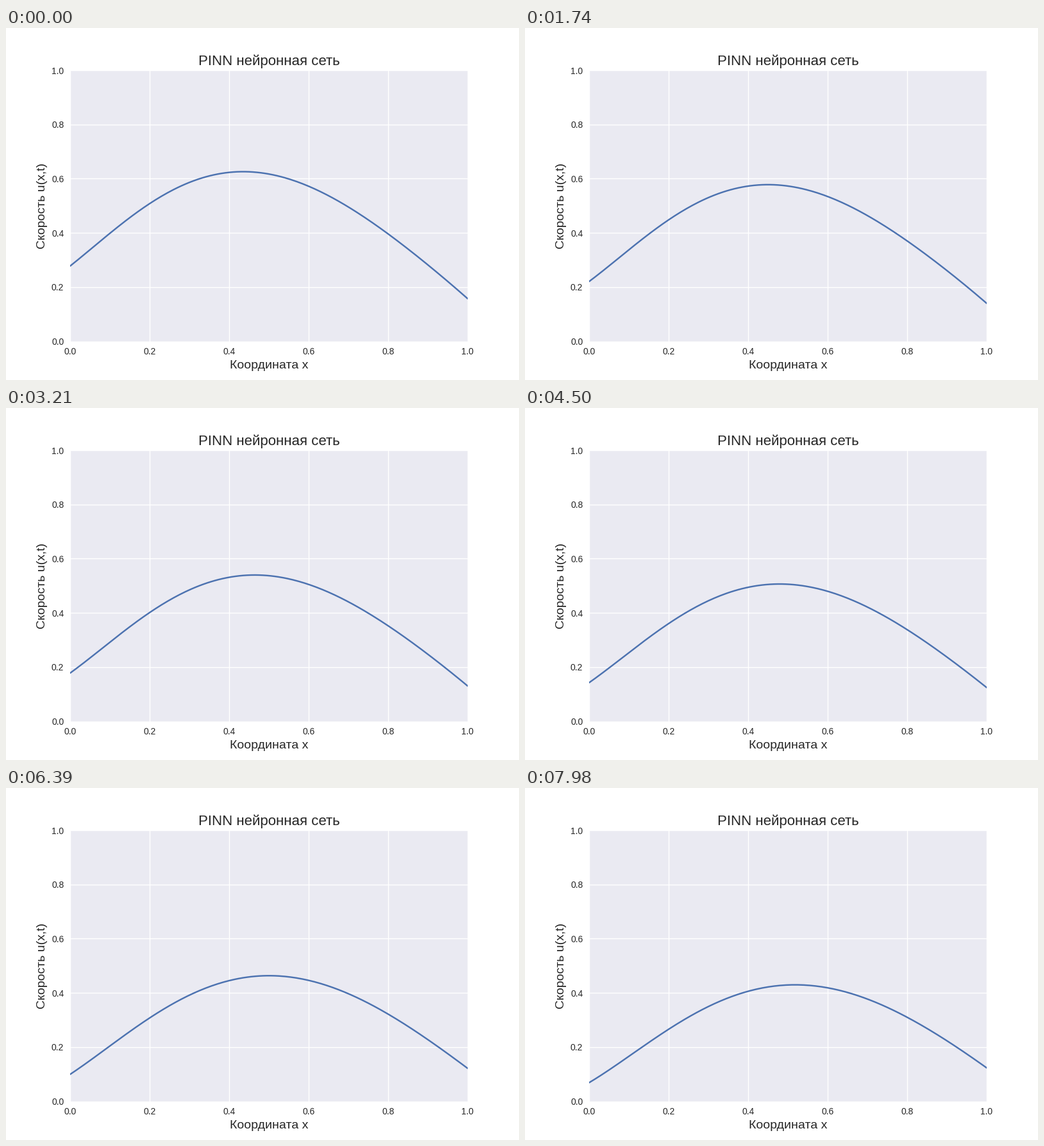
Animation, 800 px wide and 550 px high, one loop 8000 ms. Source, as a matplotlib script:

```python
import numpy as np
import matplotlib.pyplot as plt
from matplotlib.animation import FuncAnimation

LOOP, TICK, STEP = 8000, 20, 30  # ms
INK = "0.15"

plt.rcParams.update({
    "font.family": "Liberation Sans",
    "text.color": INK,
    "axes.labelcolor": INK,
    "axes.facecolor": "#EAEAF2",
    "axes.linewidth": 0,
    "axes.axisbelow": True,
    "axes.grid": True,
    "grid.color": "white",
    "grid.linewidth": 1,
    "lines.solid_capstyle": "round",
})
for axis in ("xtick", "ytick"):
    plt.rcParams.update({
        f"{axis}.color": INK,
        f"{axis}.labelsize": 10,
        f"{axis}.major.size": 0,
        f"{axis}.major.pad": 7,
    })

# Velocity at six positions (columns) for a few times (rows, seconds).
TIMES = [0, 1.74, 3.21, 4.5, 5.58, 7.2, 7.98]
NODES = np.linspace(0, 1, 6)
SPEED = np.array([
    [0.2775, 0.508, 0.623, 0.572, 0.396, 0.157],
    [0.2210, 0.448, 0.573, 0.534, 0.370, 0.140],
    [0.1770, 0.400, 0.530, 0.504, 0.352, 0.130],
    [0.1417, 0.361, 0.494, 0.480, 0.338, 0.124],
    [0.1170, 0.329, 0.466, 0.460, 0.328, 0.122],
    [0.0830, 0.285, 0.424, 0.431, 0.315, 0.122],
    [0.0685, 0.266, 0.406, 0.419, 0.310, 0.123],
])
DECAY = np.polyfit(TIMES, SPEED, 3)
x = np.linspace(0, 1, 201)


def profile(t):
    """Smooth velocity profile at t seconds."""
    values = t ** np.arange(3, -1, -1) @ DECAY
    return np.polyval(np.polyfit(NODES, values, 5), x)


fig, ax = plt.subplots(figsize=(8, 5.5), dpi=100)
ax.set(xlim=(0, 1), ylim=(0, 1))
ax.set_title("PINN нейронная сеть", fontsize=16)
ax.set_xlabel("Координата x", fontsize=14)
ax.set_ylabel("Скорость u(x,t)", fontsize=14)
line, = ax.plot(x, profile(0.0), color="#4C72B0", lw=1.75)


def update(i):
    ms = i * TICK // STEP * STEP
    line.set_ydata(profile(ms / 1000))
    return line,


anim = FuncAnimation(fig, update, frames=LOOP // TICK, interval=TICK,
                     repeat=True, repeat_delay=0, blit=False)
plt.show()
```
